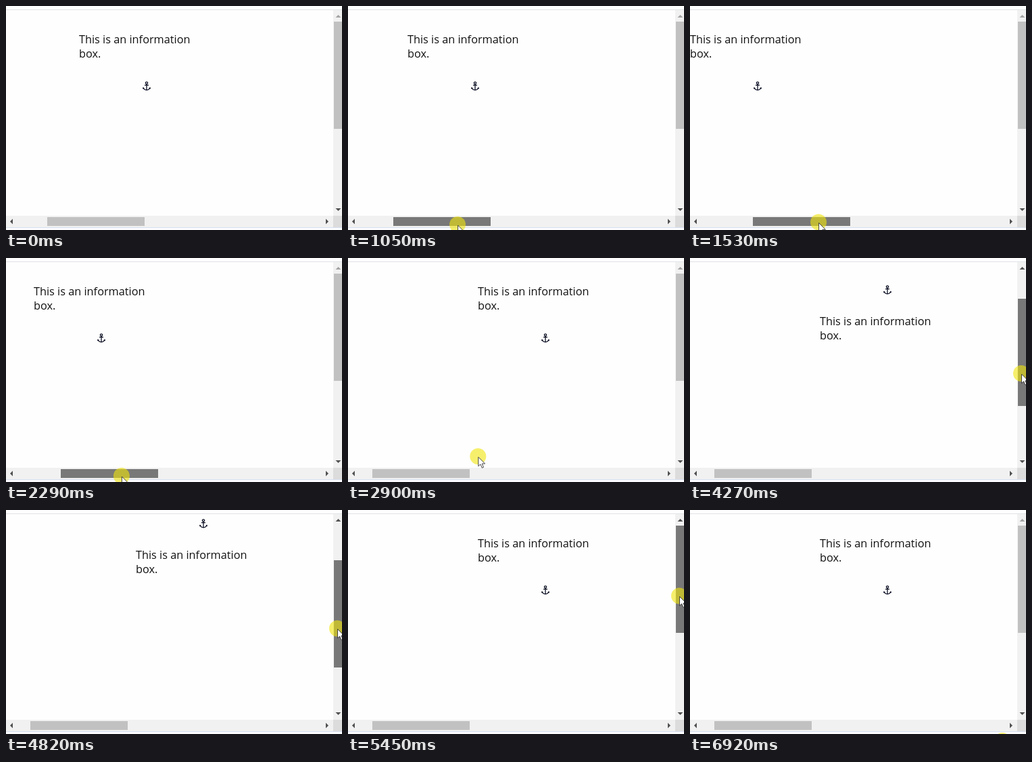
Write an HTML page that moves like this. It is 497x330 px and loops after 7050 ms.

```html
<!DOCTYPE html>
<html lang="en">
<head>
<meta charset="utf-8">
<title>Anchored information box</title>
<style>
  html, body { margin: 0; width: 100%; height: 100%; overflow: hidden; background: #fff; }
  svg { display: block; }
  text { font: 16.3px "Open Sans", "Noto Sans", sans-serif; fill: #111; }
  .arrow { fill: #505050; }
</style>
</head>
<body>
<svg width="497" height="330" viewBox="0 0 497 330">
  <defs><clipPath id="view"><rect y="6" width="484" height="303"/></clipPath></defs>
  <rect width="497" height="330" fill="#fefefe"/>
  <rect y="5" width="497" height="1" fill="#dfe3e8"/>

  <g clip-path="url(#view)">
    <g id="info"><text>This is an information</text><text y="21">box.</text></g>
    <g id="anchor" fill="none" stroke="#0c1024" stroke-width="1.3">
      <circle cy="-4.6" r="1.6"/>
      <path d="M0-3V5.5M-3-1.4H3M-5 2.4Q-4 5.6 0 5.8Q4 5.6 5 2.4"/>
      <path d="M-6 4.2L-5.3 1.4L-3 3.2ZM6 4.2L5.3 1.4L3 3.2Z" fill="#0c1024" stroke="none"/>
    </g>
  </g>

  <rect x="484" y="6" width="13" height="303" fill="#f1f1f1"/>
  <rect y="309" width="484" height="17" fill="#f1f1f1"/>
  <rect x="484" y="309" width="13" height="17" fill="#dcdcdc"/>
  <rect y="326" width="497" height="1" fill="#d6e1f2"/>
  <rect y="327" width="497" height="3" fill="#fbfcfe"/>
  <path class="arrow" d="M6 317.5l4-4v8zM477 317.5l-4-4v8zM491.5 302l-4-4h8z"/>
  <path class="arrow" id="up" d="M491.5 13l-4 4h8z"/>
  <rect id="hThumb" y="311" width="144" height="13"/>
  <rect id="vThumb" x="485" width="12" height="158"/>

  <g id="cursor">
    <circle r="12" fill="#f0e40a" fill-opacity=".6"/>
    <path d="M.5 1V14.5L3.6 11.6L6 17L8.2 16L5.9 10.8H10.3Z" fill="#fff" stroke="#333" stroke-width=".9"/>
  </g>
</svg>
<script>
const LOOP = 7050;
const H_RATIO = 3.375, V_RATIO = 1.92;
const $ = id => document.getElementById(id);

// Keyframes are [ms, value]
const hKeys = [[930, 61], [1530, 93], [1670, 105], [1810, 114], [1960, 114], [2290, 81], [2700, 36]];
const vKeys = [[3590, 23], [3730, 33], [4270, 60], [4690, 74], [4820, 74], [5030, 53], [5400, 23.3], [5560, 23]];
const xKeys = [[500, 155], [930, 155], [1530, 190], [1780, 208], [1960, 208], [2290, 171], [2660, 128],
               [2800, 128], [3180, 370], [3530, 490], [5760, 490], [6130, 433], [6900, 433], [6920, 462]];
const yKeys = [[500, 345], [650, 323], [930, 323], [1530, 318.5], [2290, 321], [2800, 322], [3180, 210],
               [3530, 131], [3590, 132], [3730, 144.5], [4230, 169], [4650, 180], [4750, 180], [4820, 174.5],
               [5030, 154], [5380, 127], [5450, 126.5], [5760, 126.5], [6130, 343], [6900, 343], [6920, 340]];

function at(keys, t) {
  if (t <= keys[0][0]) return keys[0][1];
  for (let i = 1; i < keys.length; i++) {
    const [t0, a] = keys[i - 1], [t1, b] = keys[i];
    if (t < t1) return a + (b - a) * (t - t0) / (t1 - t0);
  }
  return keys[keys.length - 1][1];
}

const move = (id, x, y) => $(id).setAttribute("transform", `translate(${x} ${y})`);

// Hover before the press, dark while dragging, hover again after release
function thumbColor(t, enter, press, release, leave) {
  if (t >= press && t < release) return "#787878";
  return t >= enter && t < leave ? "#a8a8a8" : "#c1c1c1";
}

// Above the anchor by default; right or below when there is no room
function placeInfo(ax, ay) {
  if (ax < 98) return [ax + 20, 115];
  if (ay < 92) return [ax - 100, ay + 52];
  return [ax - 100, ay - 63];
}

function draw(t) {
  const h = Math.round(at(hKeys, t)), v = at(vKeys, t);
  const ax = Math.round(208 - (h - 61) * H_RATIO);
  const ay = Math.round(118 - (v - 23) * V_RATIO);
  move("anchor", ax, ay);
  move("info", ...placeInfo(ax, ay));

  $("hThumb").setAttribute("x", h);
  $("hThumb").setAttribute("fill", thumbColor(t, 520, 980, 2830, 2900));
  $("vThumb").setAttribute("y", Math.round(v));
  $("vThumb").setAttribute("fill", thumbColor(t, 3480, 3600, 5790, 5860));
  $("up").style.fill = v > 23 ? "#505050" : "#a3a3a3";

  move("cursor", at(xKeys, t), at(yKeys, t));
  $("cursor").style.display = t < 520 || (t > 6130 && t < 6920) ? "none" : "";
}

const start = performance.now();
function tick() {
  draw((performance.now() - start) % LOOP);
  requestAnimationFrame(tick);
}
tick();
</script>
</body>
</html>
```
